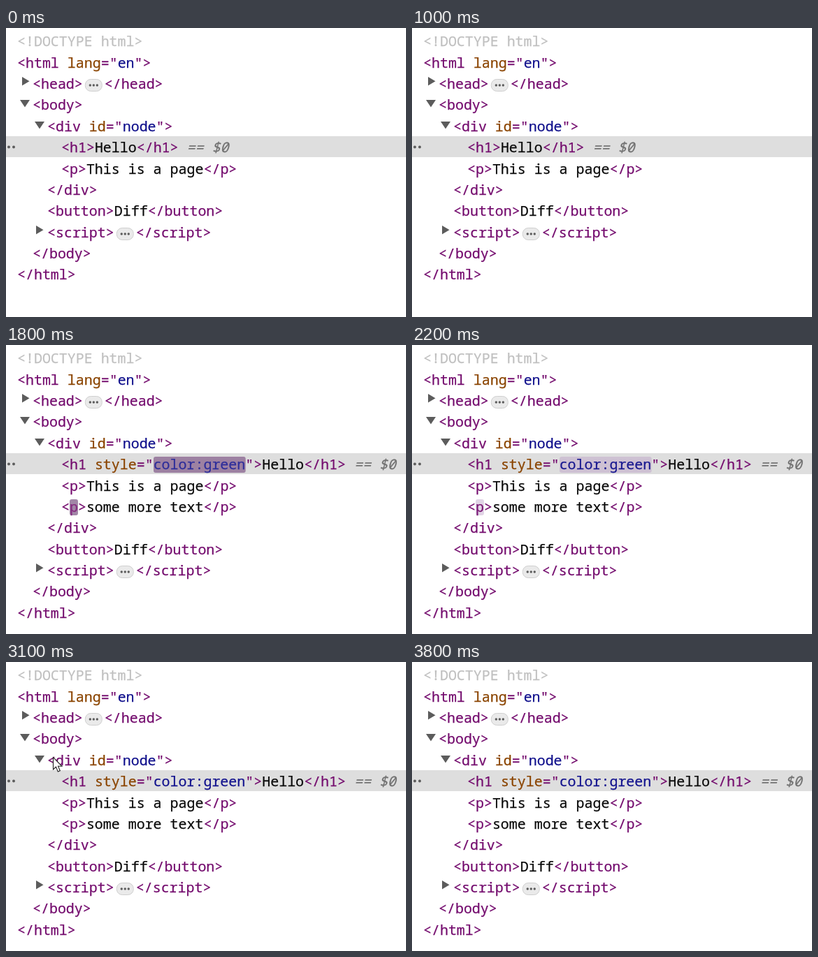
Recreate the animation shown at these times as an HTML page. Size 572 px wide and 414 px high, loop 3900 ms.

```html
<!DOCTYPE html>
<html lang="en">
<head>
<meta charset="utf-8">
<title>Element tree</title>
<style>
html, body { margin: 0; width: 100%; height: 100%; overflow: hidden; background: #fff; }
svg { display: block; }
text {
  font: 19.95px "Noto Sans Mono", "DejaVu Sans Mono", monospace; white-space: pre;
  fill: currentColor; stroke: currentColor; stroke-width: .25px;
}
.doc { color: #c0c0c0; }
.tag { color: #740c6e; }
.attr { color: #8a4400; }
.val { color: #10108c; }
.txt { color: #0a0a0a; }
.ref { color: #707070; font-style: italic; }
.mark { fill: #5c5c5c; }
</style>
</head>
<body>
<svg id="stage" width="572" height="414" viewBox="0 0 572 414"></svg>
<script>
const CELL = 11.97, ROW = 30.35, LOOP = 3900, STEP = 100;
const CHANGE = 1100, FLASH_END = 2500, POINT_IN = 3100, POINT_OUT = 3700;
const stage = document.getElementById('stage');

function add(parent, name, attrs = {}) {
  const el = document.createElementNS('http://www.w3.org/2000/svg', name);
  for (const key in attrs) el.setAttribute(key, attrs[key]);
  parent.append(el);
  return el;
}

const baseline = row => Math.round(26.4 + ROW * row);

// Parts look like "class:text"; each part starts on its own character cell.
function line(parent, row, x, ...parts) {
  const y = baseline(row);
  return parts.map(part => {
    const cut = part.indexOf(':');
    const words = part.slice(cut + 1);
    const el = add(parent, 'text', { x, y, class: part.slice(0, cut) });
    el.textContent = words;
    x += words.length * CELL;
    return el;
  });
}

function arrow(parent, row, x, open) {
  const y = baseline(row);
  const d = open ? `M${x - 7} ${y - 14}h14l-7 10.5z` : `M${x - 5} ${y - 17}v12.5l10.5-6.2z`;
  add(parent, 'path', { d, class: 'mark' });
}

function folded(parent, row, x, name) {
  line(parent, row, x, `tag:<${name}>`);
  const left = x + (name.length + 2) * CELL + 3, y = baseline(row) - 5;
  add(parent, 'rect', { x: left + .5, y: y - 8.5, width: 24, height: 17, rx: 8, fill: '#eaeaea', stroke: '#cfcfcf' });
  for (const dx of [7.5, 12.5, 17.5])
    add(parent, 'circle', { cx: left + dx, cy: y, r: 1.7, class: 'mark' });
  line(parent, row, left + 28, `tag:</${name}>`);
}

function tail(parent, row) {
  line(parent, row, 59, 'tag:</div>');
  line(parent, row + 1, 59, 'tag:<button>', 'txt:Diff', 'tag:</button>');
  arrow(parent, row + 2, 48, false);
  folded(parent, row + 2, 59, 'script');
  line(parent, row + 3, 38, 'tag:</body>');
  line(parent, row + 4, 16, 'tag:</html>');
}

function flashBox(parent, row, x, cells) {
  return add(parent, 'rect', { x, y: baseline(row) - 18, width: cells * CELL, height: 23, rx: 3 });
}

add(stage, 'rect', { y: 155, width: 572, height: 30, fill: '#dedede' });
for (const cx of [4, 11]) add(stage, 'circle', { cx, cy: 170.5, r: 2, class: 'mark' });

line(stage, 0, 16, 'doc:<!DOCTYPE html>');
line(stage, 1, 16, 'tag:<html ', 'attr:lang', 'tag:="', 'val:en', 'tag:">');
arrow(stage, 2, 28, false);
folded(stage, 2, 38, 'head');
arrow(stage, 3, 27, true);
line(stage, 3, 38, 'tag:<body>');
arrow(stage, 4, 48, true);
line(stage, 4, 59, 'tag:<div ', 'attr:id', 'tag:="', 'val:node', 'tag:">');
line(stage, 6, 79, 'tag:<p>', 'txt:This is a page', 'tag:</p>');

const before = add(stage, 'g');
line(before, 5, 79, 'tag:<h1>', 'txt:Hello', 'tag:</h1>', 'ref: == $0');
tail(before, 7);

const after = add(stage, 'g');
const boxes = [flashBox(after, 5, 211, 11), flashBox(after, 7, 91, 1)];
const styleText = line(after, 5, 79, 'tag:<h1 ', 'attr:style', 'tag:="', 'val:color:green', 'tag:">',
  'txt:Hello', 'tag:</h1>', 'ref: == $0')[3];
const tagText = line(after, 7, 79, 'tag:<', 'tag:p', 'tag:>', 'txt:some more text', 'tag:</p>')[1];
tail(after, 8);

const pointer = add(stage, 'path', {
  d: 'M67.5 136.5v17.5l4-3.7 2.8 6.8 3-1.3-2.8-6.5h5.5z',
  fill: '#fff', stroke: '#222', 'stroke-width': 1.1
});

// Time, then red, green, blue and alpha of the flash.
const glow = [
  [1100, 158, 54, 153, 1],
  [1300, 149, 72, 147, 1],
  [1800, 146, 113, 152, .85],
  [2400, 200, 170, 215, .2],
  [2500, 200, 170, 215, 0]
];
const mix = (a, b, k) => a.map((v, i) => v + (b[i] - v) * k);

function glowAt(t) {
  const i = Math.max(1, glow.findIndex(stop => stop[0] >= t));
  const [a, b] = [glow[i - 1], glow[i]];
  return mix(a, b, (t - a[0]) / (b[0] - a[0])).slice(1);
}

const show = (el, on) => el.setAttribute('visibility', on ? 'visible' : 'hidden');
const tint = (el, base, k) => { el.style.color = `rgb(${mix([255, 255, 255], base, k)})`; };

function draw(time) {
  const t = Math.floor(time % LOOP / STEP) * STEP;
  const changed = t >= CHANGE;
  show(before, !changed);
  show(after, changed);
  show(pointer, t >= POINT_IN && t < POINT_OUT);

  const flash = Math.min(Math.max(t, CHANGE), FLASH_END);
  const color = `rgba(${glowAt(flash)})`;
  for (const box of boxes) box.setAttribute('fill', color);
  const settled = 1 - Math.exp((CHANGE - flash) / 330);
  tint(styleText, [16, 16, 140], settled);
  tint(tagText, [116, 12, 110], settled);
}

const start = performance.now();
function tick() {
  draw(performance.now() - start);
  requestAnimationFrame(tick);
}
tick();
</script>
</body>
</html>
```
